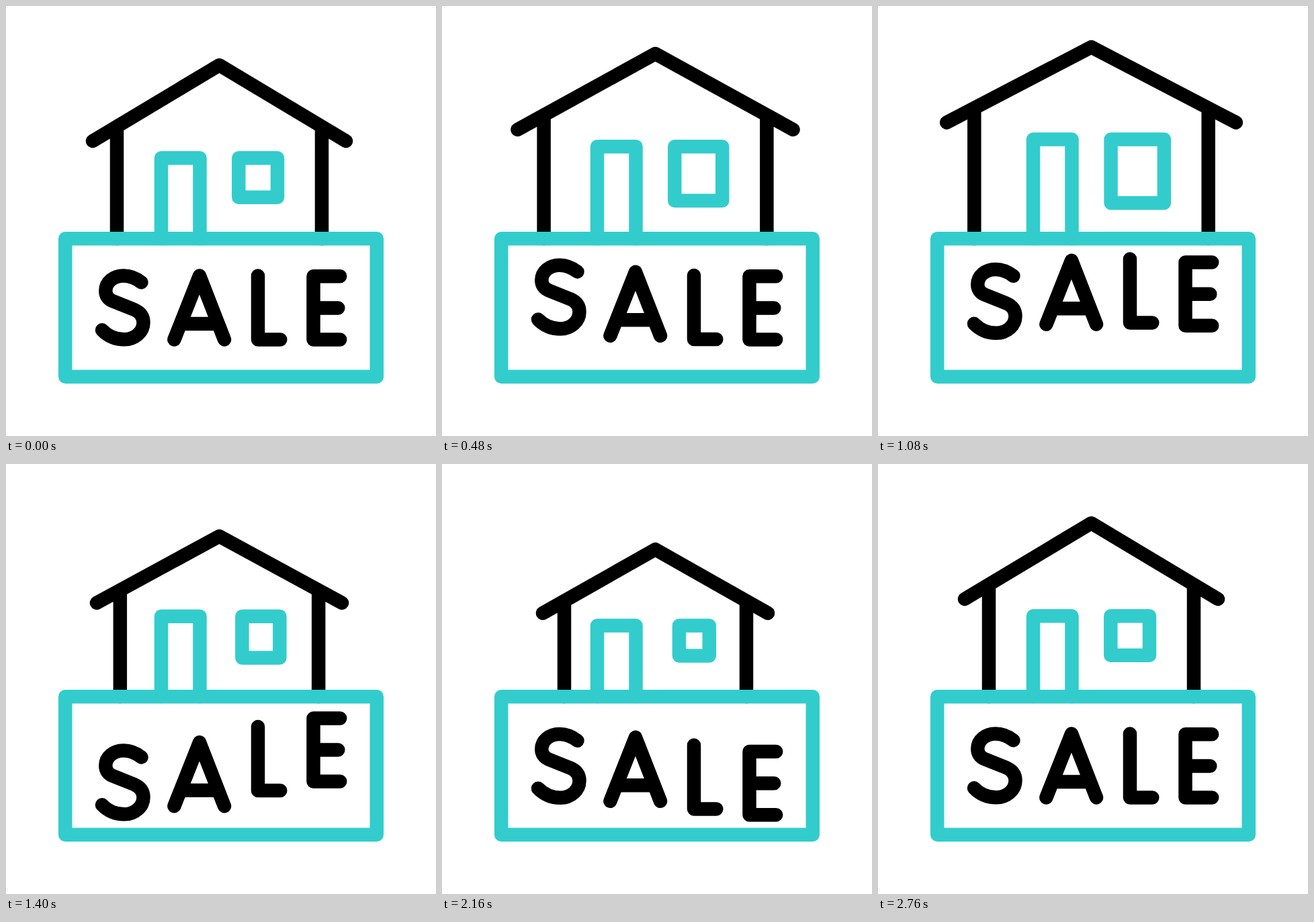
Recreate the animation shown at these times as an HTML page. Size 640 by 640 pixels, loop 3000 ms.

```html
<!DOCTYPE html>
<html lang="en">
<head>
<meta charset="utf-8">
<title>House for sale</title>
<style>
  html, body { margin: 0; width: 100%; height: 100%; overflow: hidden; background: #fff; }
  svg { display: block; width: 100%; height: 100%; }
  path {
    fill: none; stroke: #000; stroke-width: 20.5;
    stroke-linecap: round; stroke-linejoin: round;
  }
  .teal { stroke: #33cccc; }
</style>
</head>
<body>
<svg viewBox="0 0 640 640" role="img" aria-label="House with a sale sign">
  <path id="frame"/>
  <path id="openings" class="teal"/>
  <path class="teal" d="M88.2 346.2H551.8V551.8H88.2Z"/>
  <path class="letter" d="M201.5 411.3C194 405.5 186 401.5 175 401.5C160 401.5 148.3 411 148.3 424C148.3 431 152 436.3 158.5 439L191 452C200 456 204.5 462.5 204.5 471C204.5 485 192 496.3 176 496.3C162 496.3 151 490.5 143 482.3"/>
  <path class="letter" d="M250.4 496.4L288 401.5L325 496.4M260 473H315"/>
  <path class="letter" d="M375 401.5V496.4H408.3"/>
  <path class="letter" d="M497.2 402.3H457.5V496.4H497.2M457.5 449.4H494.3"/>
</svg>
<script>
  const LOOP = 3000;
  const MID = 317.5;   // ridge x
  const BASE = 346;    // ground line, hidden behind the sign
  const WALL = 0.809;  // wall distance as a share of the roof's half width

  const frame = document.getElementById('frame');
  const openings = document.getElementById('openings');
  const letters = document.querySelectorAll('.letter');

  const clamp = p => Math.min(1, Math.max(0, p));
  const ease = p => p * p / (p * p + (1 - p) * (1 - p));

  // Moves from rest through the given values, one eased step per start time
  const glide = (t, starts, length, rest, ...stops) =>
    stops.reduce((v, to, i) => v + (to - v) * ease(clamp((t - starts[i]) / length)), rest);

  function drawHouse(t) {
    // rest, tall, small, and back to rest
    const size = (rest, tall, small) =>
      glide(t, [70, 965, 1930], 760, rest, tall, small, rest);

    const half = size(188.5, 217, 163.5);
    const ridge = size(88, 58.7, 134.5);
    const drop = size(113, 113, 91.5);
    const eaves = ridge + drop;
    const wall = x => `M${x} ${ridge + drop * WALL}V${BASE}`;
    frame.setAttribute('d',
      `M${MID - half} ${eaves}L${MID} ${ridge}L${MID + half} ${eaves}` +
      wall(MID - half * WALL) + wall(MID + half * WALL));

    const top = size(226.3, 197, 243.2);
    const left = size(346.3, 346.3, 354.2);
    const right = size(404, 426.8, 396.6);
    const sill = size(284.7, 293.4, 285.8);
    openings.setAttribute('d',
      `M231 ${BASE}V${top}H288.5V${BASE}` +
      `M${left} ${top}H${right}V${sill}H${left}Z`);
  }

  // The letters bob up, down and back, each a little later than the one before
  function drawLetters(t) {
    const beat = 725, first = 70;
    const starts = [0, 1, 2].map(n => first + n * beat);
    letters.forEach((letter, i) => {
      const lag = 150 * i + 7 * i * i;
      letter.setAttribute('transform',
        `translate(0 ${glide(t - lag, starts, beat, 0, -25, 27, 0)})`);
    });
  }

  function draw(now) {
    const t = now % LOOP;
    drawHouse(t);
    drawLetters(t);
    requestAnimationFrame(draw);
  }
  draw(0);
</script>
</body>
</html>
```
